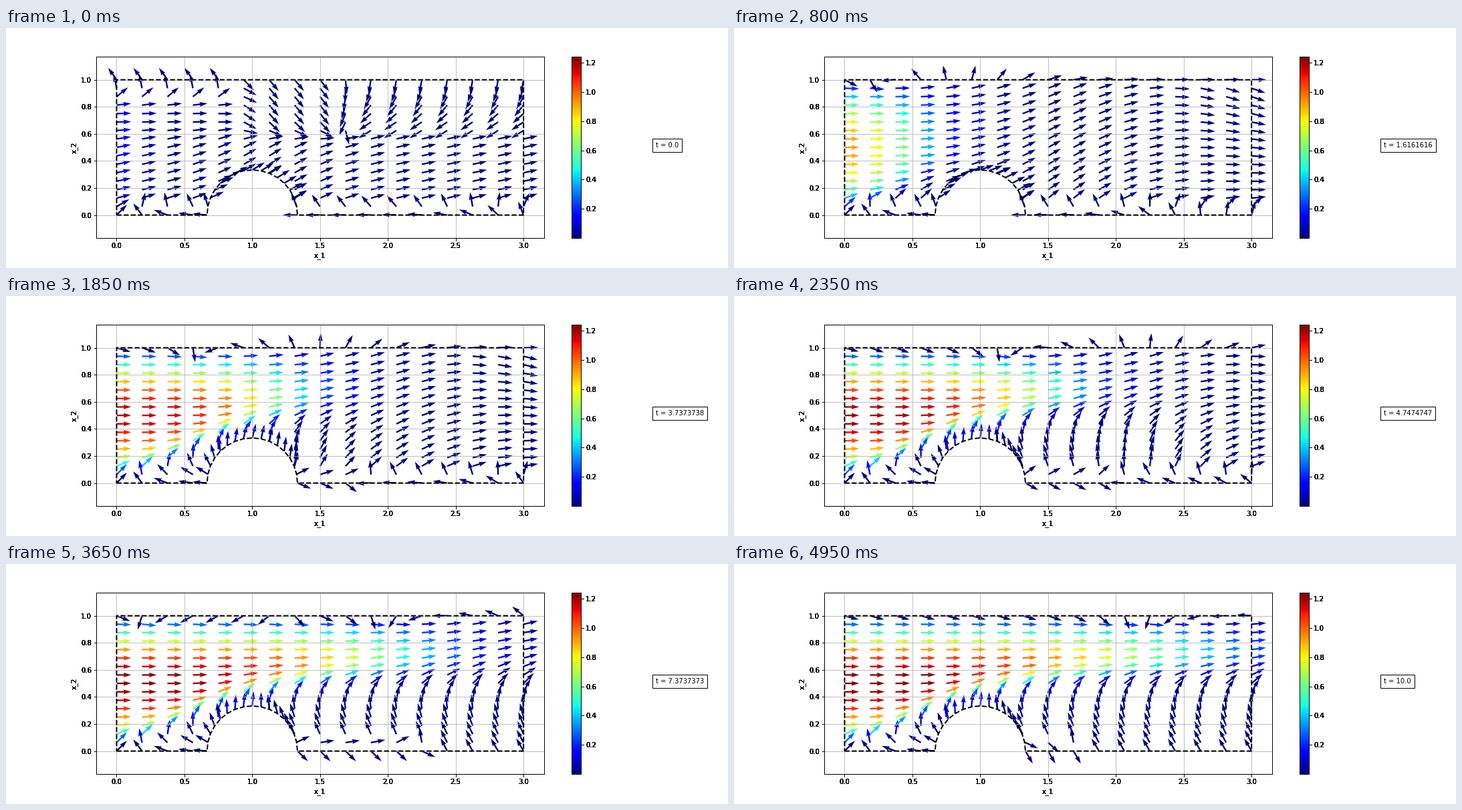
A matplotlib script that plays this animation: 1080x360 px, repeating every 5000 ms.

```python
import numpy as np
import matplotlib.pyplot as plt
from matplotlib.animation import FuncAnimation
from matplotlib.cm import ScalarMappable
from matplotlib.colors import Normalize

FRAMES, T_END, V_MAX = 100, 10.0, 1.241
N, R = 17, 1 / 3


def step(z):
    """Smooth step from 0 to 1."""
    return 1 / (1 + np.exp(-np.clip(z, -50, 50)))


def bump(z):
    return np.exp(-z**2)


def unit(deg):
    return np.exp(1j * np.radians(deg))


def mix(a, b, w):
    return (1 - w) * a + w * b


# Square grid outside the half cylinder, plus points along its surface.
gx, gy = np.meshgrid(np.linspace(0, 3, N), np.linspace(0, 1, N))
outside = np.hypot(gx - 1, gy) > R
arc = np.linspace(0, np.pi, N)
arc_x, arc_y = 1 + R * np.cos(arc), R * np.sin(arc)
x = np.append(gx[outside], arc_x)
y = np.append(gy[outside], arc_y)


def initial_flow():
    """Start state: rightward below, converging downward flow above."""
    low = unit(12 + 20 * bump((x - 1.1) / 0.5))
    left = unit(130 * step((y - 0.9) / 0.03))
    right = unit(-170 + 155 * (y - 0.55))
    high = mix(left, unit(-50), step((x - 0.9) / 0.05))
    high = mix(high, right, step((x - 1.65) / 0.05))
    return mix(low, high, step((y - 0.6) / 0.04))


def channel_flow(t):
    """Stream over the cylinder with a rising wake below it."""
    edge = 0.45 * step((x - 0.5) / 0.2) - 0.02
    reach = step((0.1 + 0.1 * t**2 - x) / 0.25)
    wake = (118 + 30 * bump(x / 0.6)) * reach
    wake = wake * step((edge - y) / (0.06 + 0.01 * x))
    lift = 34 * np.exp(-t / 6) * bump((x - 1.25 - 0.22 * t) / 0.7)
    return wake + lift * (1.4 - 0.6 * y) * (1 - reach * step((edge - y) / 0.06)) + droop(t)


def droop(t):
    return -25 * y**2 * step((x - 2.5) / 0.15) * step((4.5 - t) / 0.4)


def top_flow(t):
    """One clockwise turn along the upper wall, carried downstream."""
    turn = np.interp(t, [0, 0.7, 2.6, 3.7, 5.9, 10], [-0.1, 0.1, 0.5, 0.6, 1.85, 2.2])
    soft = 0.04 + 0.015 * t
    first = step((x - turn) / soft)
    second = step((x - turn - 0.3 - 0.15 * t) / 0.3)
    bubble = bump((t - 7) / 1.2) * step((x - 0.15) / 0.05) * step((1.25 - x) / 0.05)
    return -15 - 165 * first - 180 * second - 150 * bubble


def floor_flow(t):
    """Backflow before the cylinder, a growing eddy behind it."""
    before = unit(180 - 135 * np.exp(-x / 0.2))
    turn = 1.9 + 0.3 * t + np.exp(-5 * t)
    ahead = unit(180 - 60 * step((t - 5) / 0.4) - 110 * step((x - turn) / 0.2))
    eddy_end = 2.3 - 0.052 * (t - 7) ** 2
    behind = mix(ahead, unit(-6 * t), step((eddy_end - x) / 0.08))
    return np.where(x < 1, before, behind)


START = initial_flow()


def direction(t):
    flow = mix(unit(channel_flow(t)), unit(top_flow(t)), bump((1 - y) / 0.04))
    flow = mix(flow, START, np.exp(-t / 0.25))
    flow = mix(flow, floor_flow(t), bump(y / 0.08))
    return flow / np.maximum(abs(flow), 1e-9)


def speed(t):
    peak = 1.24 * (1 - 0.88 * np.exp(-t / 1.3))
    front = 3.9 * (1 - np.exp(-t / 7.5)) - 0.3
    soft = 0.15 + 0.03 * t
    reach = step((front - x) / soft) / step(front / soft)
    slow = 0.75 * (1 - np.exp(-x / 0.75)) - 0.1
    return peak * 4 * y * (1 - y) * reach * step((y - slow) / 0.05)


fig = plt.figure(figsize=(15, 5), dpi=72, facecolor="white")
MAIN_BOX = [0.125, 0.125, 0.62, 0.755]
BAR_BOX = [0.78375, 0.125, 0.755 / 60, 0.755]
BAR_TICKS = np.arange(0.2, 1.3, 0.2)


def main_axes():
    ax = fig.add_axes(MAIN_BOX, facecolor="none")
    half = 0.5 * 3.3 * (0.755 * 5) / (0.62 * 15)
    ax.set(xlim=(-0.15, 3.15), ylim=(0.5 - half, 0.5 + half),
           xticks=np.arange(0, 3.1, 0.5), yticks=np.arange(0, 1.1, 0.2),
           xlabel="x_1", ylabel="x_2")
    return ax


def bar_axes():
    ax = fig.add_axes(BAR_BOX, facecolor="none")
    ax.yaxis.tick_right()
    ax.set(xticks=[], ylim=(0, V_MAX), yticks=BAR_TICKS)
    return ax


ax = main_axes()
ax.grid(True)
norm = Normalize(0, V_MAX)
bar = fig.colorbar(ScalarMappable(norm, "jet"), cax=fig.add_axes(BAR_BOX))
bar.set_ticks(BAR_TICKS)

# Overdrawn frames give the heavy, hard-edged labels.
for _ in range(5):
    main_axes()
    bar_axes()

edge_x = np.concatenate([[0], arc_x[::-1], [3, 3, 0, 0]])
edge_y = np.concatenate([[0], arc_y[::-1], [0, 1, 1, 0]])
ax.plot(edge_x, edge_y, "k--", lw=2)

d = direction(0)
arrows = ax.quiver(x, y, d.real, d.imag, speed(0), cmap="jet",
                   norm=norm, scale=1.8 * N, width=0.06 / N)
clock = ax.text(1.25, 0.5, "", transform=ax.transAxes,
                bbox={"facecolor": "white", "pad": 5})


def update(i):
    t = T_END * i / (FRAMES - 1)
    d = direction(t)
    arrows.set_UVC(d.real, d.imag, speed(t))
    clock.set_text(f"t = {str(np.float32(t))}")
    return arrows, clock


anim = FuncAnimation(fig, update, frames=FRAMES, interval=1000 * 5 / FRAMES,
                     repeat=True)
plt.show()
```
